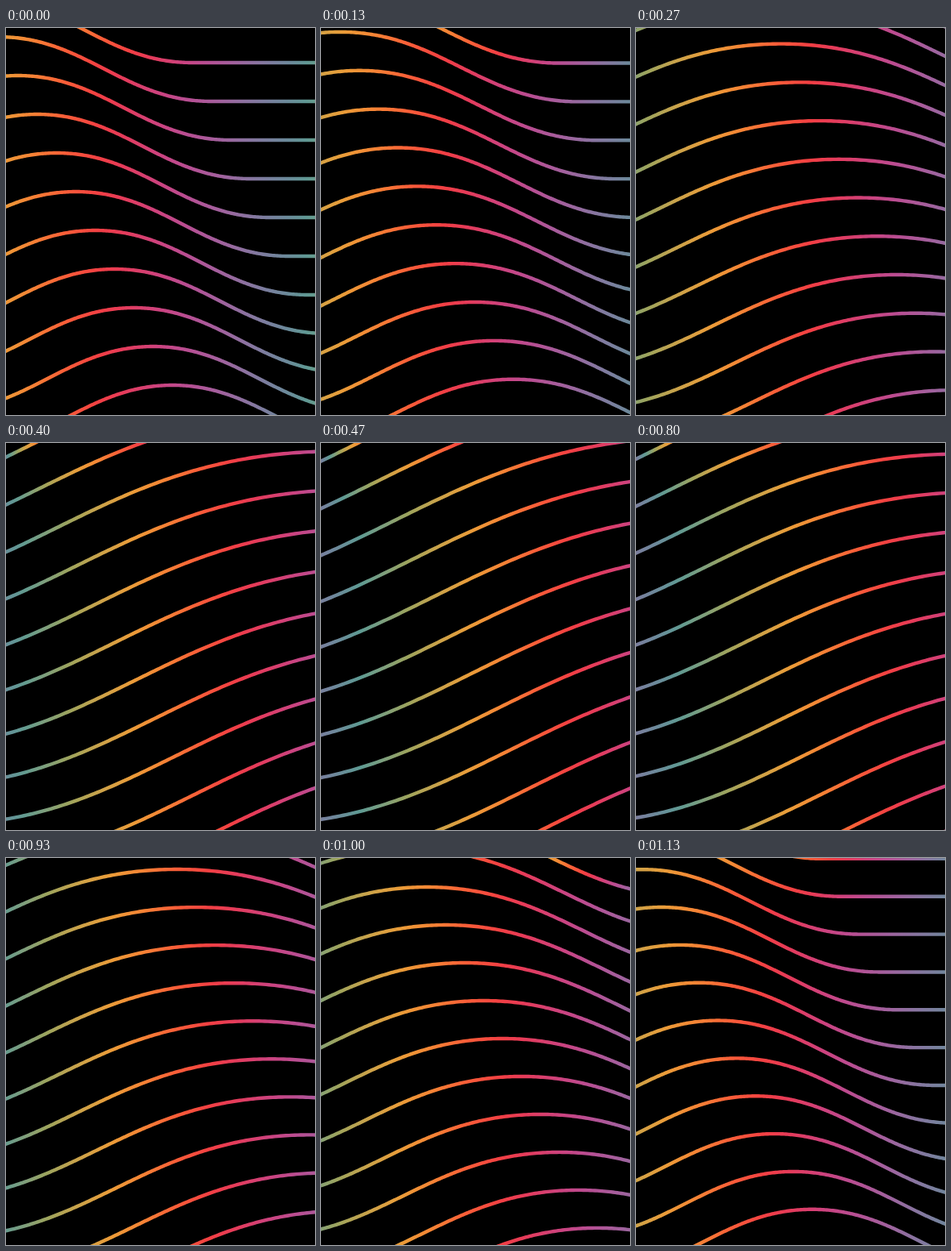
Write an HTML page with a canvas that moves like this. It is 384 px wide and 480 px high and loops after 1.19 s.

```html
<!DOCTYPE html>
<html lang="en">
<head>
<meta charset="utf-8">
<title>Flowing lines</title>
<style>
  html, body { margin: 0; width: 100%; height: 100%; overflow: hidden; background: #000; }
  canvas { display: block; width: 384px; height: 480px; }
</style>
</head>
<body>
<canvas id="stage" width="384" height="480"></canvas>
<script>
const W = 384, H = 480, LOOP = 1190, STEP = 200 / 3;
const ctx = document.getElementById('stage').getContext('2d');

// Cyclic palette: position along the cycle, colour
const CYCLE = 1.36;
const PALETTE = [
  [0, '5e9a93'], [.08, '7f9f7c'], [.15, '9ba45e'], [.25, 'caa34a'], [.36, 'eb9c38'],
  [.46, 'f58435'], [.57, 'f95e38'], [.68, 'f23f43'], [.76, 'e53b5a'], [.87, 'cd427e'],
  [.96, 'b94d92'], [1.08, 'a0629e'], [1.18, '8577a0'], [1.28, '6d889b'], [CYCLE, '5e9a93']
].map(([p, hex]) => [p, [0, 2, 4].map(i => parseInt(hex.slice(i, i + 2), 16))]);

// Palette position at the left edge: time, position
const PHASE = [[0, .38], [130, .29], [400, -.05], [600, -.28], [800, -.14], [1000, .1], [1130, .26], [1200, .32]];

const mix = (a, b, k) => a + (b - a) * k;

function segment(table, x) {
  let i = 1;
  while (i < table.length - 1 && table[i][0] < x) i++;
  const [x0, a] = table[i - 1], [x1, b] = table[i];
  return [a, b, (x - x0) / (x1 - x0)];
}

function colorAt(p) {
  const [a, b, k] = segment(PALETTE, ((p % CYCLE) + CYCLE) % CYCLE);
  return `rgb(${a.map((v, i) => Math.round(mix(v, b[i], k)))})`;
}

// Cubic that starts at 0
const cubic = (s, c1, c2, end = 1) => 3 * s * (1 - s) ** 2 * c1 + 3 * s * s * (1 - s) * c2 + s ** 3 * end;

function ease(u, x1, x2) {
  let lo = 0, hi = 1;
  for (let i = 0; i < 24; i++) {
    const mid = (lo + hi) / 2;
    if (cubic(mid, x1, x2) < u) lo = mid; else hi = mid;
  }
  return lo * lo * (3 - 2 * lo);
}

const stretch = t => t < 600 ? ease(t / 600, .55, .5) : ease((1200 - t) / 600, .4, .58);

// One hump: foot, peak, mirrored foot, then flat
function hump(w) {
  const len = mix(264, 737, w), lift = mix(80, 209, w ** 1.1);
  const foot = mix(108, 285, w), peak = mix(107, 345, w);
  const rise = [], N = 160;
  for (let i = 0; i <= N; i++) {
    const s = i / N;
    rise.push([cubic(s, foot, len - peak, len), -lift * s * s * (3 - 2 * s)]);
  }
  const fall = rise.slice(0, -1).reverse().map(([x, y]) => [2 * len - x, y]);
  return [[-900, 0], ...rise, ...fall, [2 * len + 900, 0]];
}

// Horizontal span of the part below the upper edge
function span(pts) {
  const top = -18;
  let lo = W, hi = 0;
  const add = x => {
    x = Math.min(W, Math.max(0, x));
    lo = Math.min(lo, x);
    hi = Math.max(hi, x);
  };
  for (let i = 1; i < pts.length; i++) {
    const [x0, y0] = pts[i - 1], [x1, y1] = pts[i];
    if (x1 < 0 || x0 > W) continue;
    if (y0 >= top) add(x0);
    if (y1 >= top) add(x1);
    if ((y0 < top) !== (y1 < top)) add(mix(x0, x1, (top - y0) / (y1 - y0)));
  }
  return [lo, hi];
}

function draw(t) {
  const shape = hump(stretch(t));
  const zoom = 1 - .024 * t / 1130;
  const phase = mix(...segment(PHASE, t));
  ctx.fillStyle = '#000';
  ctx.fillRect(0, 0, W, H);
  ctx.lineWidth = 4.4;
  ctx.lineJoin = 'round';

  for (let j = -14; j <= 8; j++) {
    const pts = shape.map(([x, y]) => [
      192 + (x - 57 + 24 * j - 192) * zoom,
      240 + (y + 523 + 48 * j - 240) * zoom
    ]);
    const [lo, hi] = span(pts);
    if (hi <= lo) continue;
    const grad = ctx.createLinearGradient(lo, 0, hi, 0);
    for (let i = 0; i <= 32; i++) grad.addColorStop(i / 32, colorAt(phase + i / 32));
    ctx.strokeStyle = grad;
    ctx.beginPath();
    pts.forEach(([x, y]) => ctx.lineTo(x, y));
    ctx.stroke();
  }
}

let shown = -1;
const start = performance.now();
function tick() {
  const t = Math.max(0, performance.now() - start) % LOOP;
  const step = Math.floor((t + 3.4) / STEP);
  if (step !== shown) draw((shown = step) * STEP);
  requestAnimationFrame(tick);
}
tick();
</script>
</body>
</html>
```
